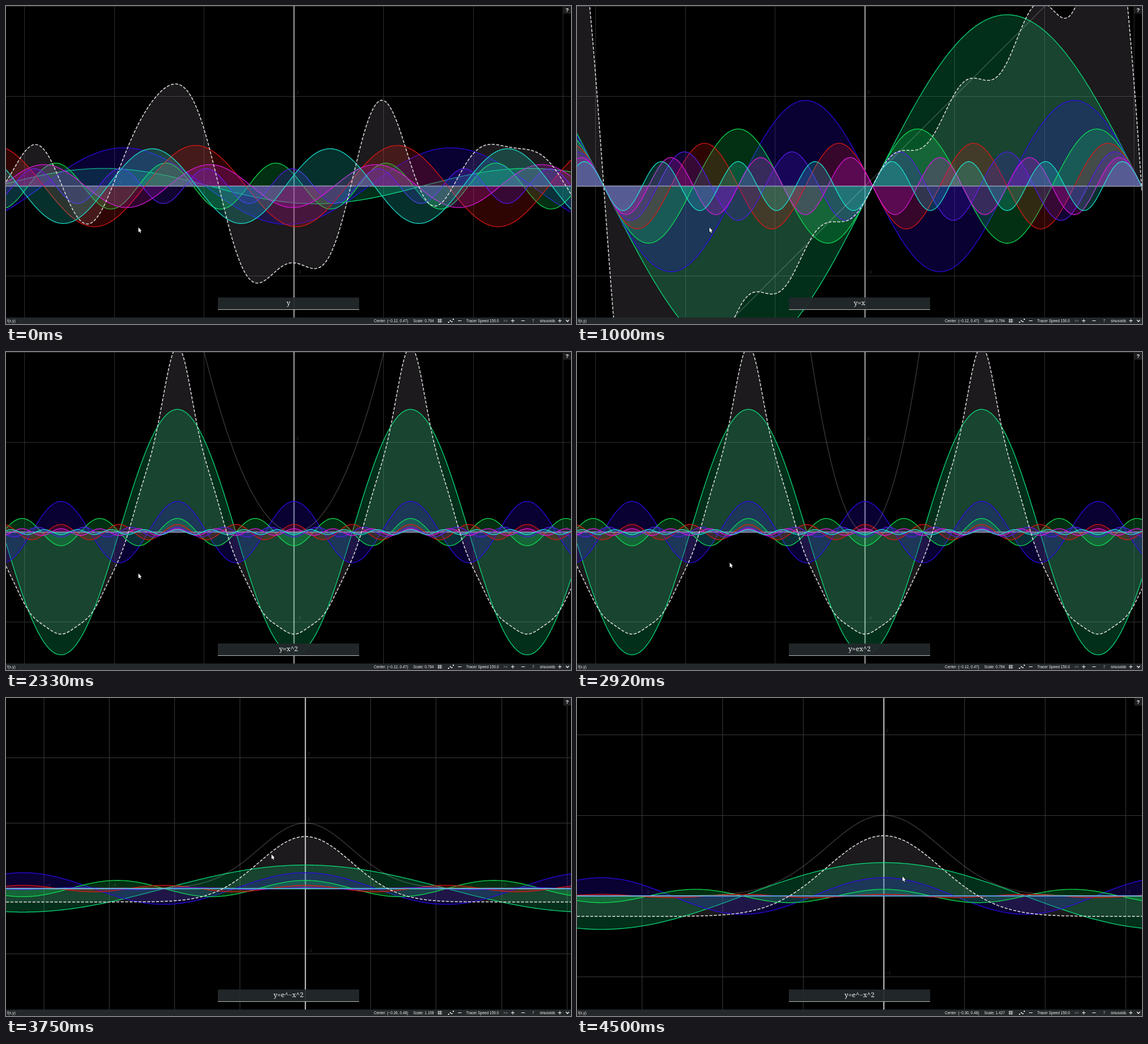
Write an HTML page with a canvas that moves like this. It is 960 px wide and 540 px high and loops after 4.58 s.

```html
<!DOCTYPE html>
<html lang="en">
<head>
<meta charset="utf-8">
<title>Sinusoid plotter</title>
<style>
  html, body { margin: 0; width: 100%; height: 100%; overflow: hidden; background: #000; }
  canvas { display: block; width: 960px; height: 540px; }
</style>
</head>
<body>
<canvas id="stage" width="960" height="540"></canvas>
<script>
const ctx = document.getElementById('stage').getContext('2d');
const W = 960, H = 540, BAR = 529;
const LOOP = 4580, TICK = 1000 / 12;
const PX = 76.25;          // pixels per unit in the first view
const UNIT_SCALE = 96.03;  // pixels per unit at scale 1
const PI = Math.PI;

const COLORS = ['12,222,124', '46,8,230', '16,222,84', '222,24,22',
                '82,26,234', '218,24,218', '28,226,208'];

// amplitude, period and peak offset in pixels of the opening waves
const OPENING = [
  [30, 722, -324], [65, 555, -289], [39, 187, -31], [69, 343, -167.5],
  [29.5, 146, -3], [36.5, 282, -143], [63.5, 302, 61]
];

const mix = (a, b, p) => a + (b - a) * p;
const clamp = p => Math.max(0, Math.min(1, p));

// each wave is amp * cos(k * x + phase), in graph units
const series = {
  opening: () => OPENING.map(([a, period, peak]) => {
    const k = 2 * PI * PX / period;
    return { amp: a / PX, k, phase: -k * peak / PX };
  }),
  linear: () => COLORS.map((_, i) => {
    const n = i + 1, half = 5.993, k = n * PI / half;
    return { amp: 2 * half / (n * PI), k, phase: -k * 0.17 + (n % 2 ? -PI / 2 : PI / 2) };
  }),
  square: () => COLORS.map((_, i) => {
    const n = i + 1, half = 2.597;
    return { amp: 4 * half * half / (n * n * PI * PI), k: n * PI / half, phase: n % 2 ? PI : 0 };
  }),
  bell: s => COLORS.map((_, i) => {
    const half = W / 2 / s, k = (i + 1) * PI / half;
    return { amp: Math.sqrt(PI) / half * Math.exp(-k * k / 4), k, phase: 0 };
  })
};

// tick, typed text, plotted function
const TYPING = [
  [0, 'y', null],
  [2, 'y=', null],
  [3, 'y=x', x => x],
  [20, 'y=x^', null],
  [24, 'y=x^2', x => x * x],
  [35, 'y=ex^2', x => Math.E * x * x],
  [36, 'y=e^x^2', x => Math.exp(x * x)],
  [38, 'y=e^\u2212x^2', x => Math.exp(-x * x)]
];

// first tick, number of ticks, from, to
const MORPHS = [
  [3, 4, 'opening', 'linear'],
  [24, 5, 'linear', 'square'],
  [38, 4, 'square', 'bell']
];

// tick, origin x, origin y, pixels per unit
const VIEWS = [[39, 489.4, 305.8, PX], [41, 495.3, 310.4, 84.1], [48, 521.4, 336.2, 137.03]];

// tick, x, y
const POINTER = [[34, 225, 376], [40, 432, 265], [41, 432, 265], [48, 465.5, 266], [54, 553, 303]];

function span(keys, tick) {
  let i = 0;
  while (i < keys.length - 2 && tick >= keys[i + 1][0]) i++;
  const a = keys[i], b = keys[i + 1];
  return [a, b, clamp((tick - a[0]) / (b[0] - a[0]))];
}

function viewAt(tick) {
  const [a, b, p] = span(VIEWS, tick);
  const s = a[3] * Math.pow(b[3] / a[3], p);
  const q = (s - a[3]) / (b[3] - a[3]);
  return { ox: mix(a[1], b[1], q), oy: mix(a[2], b[2], q), s };
}

function wavesAt(tick, s) {
  const m = MORPHS.filter(m => tick >= m[0]).pop();
  if (!m) return series.opening();
  const left = 1 - clamp((tick - m[0] + 1) / m[1]);
  const p = 1 - left * left;
  const to = series[m[3]](s);
  if (p === 1) return to;
  return series[m[2]](s).map((w, i) => ({
    amp: mix(w.amp, to[i].amp, p),
    k: mix(w.k, to[i].k, p),
    phase: mix(w.phase, to[i].phase, p)
  }));
}

function trace(f, v) {
  ctx.beginPath();
  for (let x = 0; x <= W; x += 2) {
    const y = v.oy - v.s * f((x - v.ox) / v.s);
    ctx.lineTo(x, Math.max(-2000, Math.min(2500, y)));
  }
}

function fillToAxis(f, v, color) {
  trace(f, v);
  ctx.lineTo(W, v.oy);
  ctx.lineTo(0, v.oy);
  ctx.fillStyle = color;
  ctx.fill();
}

function strokeCurve(f, v, color, width) {
  trace(f, v);
  ctx.strokeStyle = color;
  ctx.lineWidth = width;
  ctx.stroke();
}

function rect(x, y, w, h, color) {
  ctx.fillStyle = color;
  ctx.fillRect(x, y, w, h);
}

function text(str, x, y, font, color, align = 'left') {
  ctx.font = font;
  ctx.fillStyle = color;
  ctx.textAlign = align;
  ctx.fillText(str, x, y);
}

const signed = n => String(n).replace('-', '\u2212');

function drawGrid(v, zoomed) {
  const step = v.s > 100 ? 1 : 2;
  const line = zoomed ? '#363636' : '#2c2c2c';
  const axis = zoomed ? '#d8d8d8' : '#b4b4b4';
  const font = '7px "Liberation Sans", Arial, sans-serif';
  for (let n = -8; n <= 8; n += step) {
    if (!n) continue;
    const x = v.ox + n * v.s, y = v.oy - n * v.s;
    rect(Math.floor(x), 0, 1, BAR, line);
    rect(0, Math.floor(y), W, 1, line);
    text(signed(n), x + 4, v.oy - 4, font, '#333');
    text(signed(n), v.ox + 4, y - 4, font, '#333');
  }
  rect(v.ox - 0.9, 0, 1.8, BAR, axis);
  rect(0, v.oy - 0.9, W, 1.8, axis);
}

function drawCurves(v, waves, plotted) {
  const fns = waves.map(w => x => w.amp * Math.cos(w.k * x + w.phase));
  const total = x => fns.reduce((sum, f) => sum + f(x), 0);
  fillToAxis(total, v, 'rgba(250,232,255,0.11)');
  fns.forEach((f, i) => {
    fillToAxis(f, v, `rgba(${COLORS[i]},0.21)`);
    strokeCurve(f, v, `rgba(${COLORS[i]},0.95)`, 1.3);
  });
  if (plotted) strokeCurve(plotted, v, 'rgba(255,255,255,0.2)', 1.5);
  ctx.setLineDash([5, 2.5]);
  strokeCurve(total, v, '#dcdcdc', 1.5);
  ctx.setLineDash([]);
}

function drawInput(str) {
  rect(360, 495, 240, 20, 'rgba(36,41,44,0.93)');
  rect(360, 515, 240, 1, '#b4b4b4');
  text(str, 480, 508, '11.4px "Noto Serif", "Liberation Serif", serif', '#f4f4f4', 'center');
}

function sign(x, plus) {
  rect(x, 534, 6, 1, '#f0f0f0');
  if (plus) rect(x + 2.5, 531.5, 1, 6, '#f0f0f0');
}

function drawBar(v) {
  const font = '6.3px "Liberation Sans", Arial, sans-serif';
  const label = (str, x, color = '#f0f0f0') => text(str, x, 536.5, font, color);
  const num = (n, d) => signed(n.toFixed(d));
  rect(0, BAR, W, H - BAR, '#24282a');
  label('f(x,y)', 2);
  label(`Center: (${num((480 - v.ox) / v.s, 2)}, ${num((v.oy - 270) / v.s, 2)})`, 625);
  label(`Scale: ${num(v.s / UNIT_SCALE, 3)}`, 692);
  for (const d of [2, 5]) {
    rect(733 + d, 531, 1, 7, '#d8d8d8');
    rect(733, 530.5 + d, 8, 1, '#d8d8d8');
  }
  for (const [x, y] of [[751, 536], [754, 533.5], [756.5, 535], [759, 531]]) rect(x, y, 2, 2, '#e8e8e8');
  sign(768);
  label('Tracer Speed 150.0', 782);
  label('>>', 845, '#a0a0a0');
  sign(858, true);
  sign(875.5);
  label('7', 894, '#c8c8c8');
  label('sinusoids', 907);
  sign(938, true);
  ctx.beginPath();
  ctx.moveTo(951.5, 533);
  ctx.lineTo(954, 536);
  ctx.lineTo(956.5, 533);
  ctx.strokeStyle = '#f0f0f0';
  ctx.lineWidth = 1.3;
  ctx.stroke();
}

function drawPointer(tick) {
  const [a, b, p] = span(POINTER, tick);
  ctx.save();
  ctx.translate(mix(a[1], b[1], p), mix(a[2], b[2], p));
  ctx.beginPath();
  for (const [x, y] of [[0, 0], [0, 8], [1.8, 6.6], [3, 9.3], [4.3, 8.7], [3.2, 6.1], [5.4, 5.8]]) ctx.lineTo(x, y);
  ctx.closePath();
  ctx.strokeStyle = '#000';
  ctx.lineWidth = 1;
  ctx.stroke();
  ctx.fillStyle = '#fff';
  ctx.fill();
  ctx.restore();
}

function draw(tick) {
  const v = viewAt(tick);
  const typed = TYPING.filter(k => tick >= k[0]).pop();
  rect(0, 0, W, H, '#000');
  drawGrid(v, v.s > PX);
  drawCurves(v, wavesAt(tick, v.s), typed[2]);
  drawInput(typed[1]);
  drawBar(v);
  rect(947, 0, 13, 13, '#1e1e20');
  text('?', 953.5, 9.5, 'bold 9px "Liberation Sans", Arial, sans-serif', '#f4f4f4', 'center');
  drawPointer(tick);
}

const start = performance.now();
function frame() {
  const t = Math.max(0, performance.now() - start) % LOOP;
  draw(Math.min(54, Math.floor((t + 5) / TICK)));
  requestAnimationFrame(frame);
}
frame();
</script>
</body>
</html>
```
